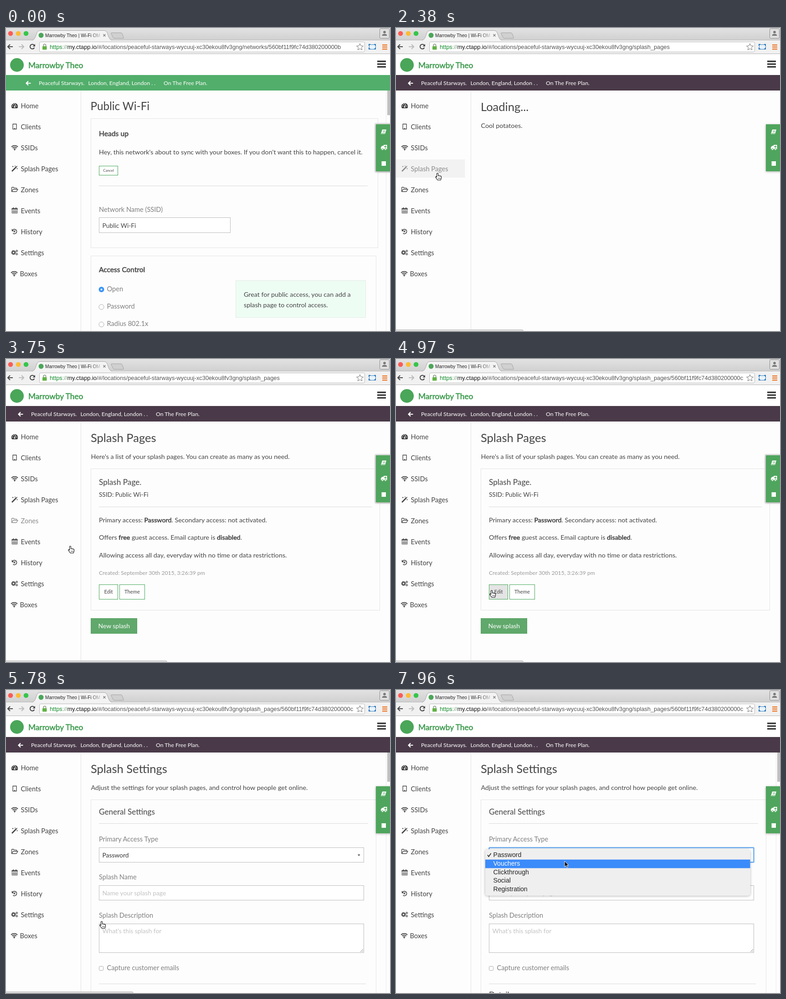
Write an HTML page that moves like this. It is 843 px wide and 664 px high and loops after 8000 ms.

```html
<!DOCTYPE html>
<html lang="en">
<head>
<meta charset="utf-8">
<title>Splash page settings</title>
<style>
html, body { margin: 0; width: 100%; height: 100%; overflow: hidden; background: #fdfdfd; }
svg { display: block; width: 100vw; height: 100vh; }
text { white-space: pre; font-family: Lato, sans-serif; }
.ui { font-family: "Liberation Sans", Arial, sans-serif; }
</style>
</head>
<body>
<svg id="stage" viewBox="0 0 843 664"></svg>
<script>
const INK = '#444', SOFT = '#808080', GREEN = '#4aa659', LINE = '#e4e4e4';
const BRAND = 'Marrowby Theo', PLACE = 'Peaceful Starways';

// Markup helpers
const text = (x, y, s, size = 14.3, fill = INK, more = '') =>
  `<text x="${x}" y="${y}" font-size="${size}" fill="${fill}" ${more}>${s}</text>`;
const ui = (x, y, s, size, fill, more = '') => text(x, y, s, size, fill, 'class="ui" ' + more);
const bold = (x, y, s, size, fill = INK) => text(x, y, s, size, fill, `stroke="${fill}" stroke-width=".55"`);
const strong = s => `<tspan stroke="${INK}" stroke-width=".55">${s}</tspan>`;
const label = (x, y, s) => text(x, y, s, 14.6, SOFT);
const rect = (x, y, w, h, fill, more = '') =>
  `<rect x="${x}" y="${y}" width="${w}" height="${h}" fill="${fill}" ${more}/>`;
const box = (x, y, w, h, stroke = LINE, fill = 'none', more = '') =>
  rect(x + .5, y + .5, w, h, fill, `stroke="${stroke}" ${more}`);
const rule = (y, x2) => rect(204, y, x2 - 204, 1, '#dadada');
const circle = (x, y, r, fill, more = '') => `<circle cx="${x}" cy="${y}" r="${r}" fill="${fill}" ${more}/>`;
const path = (d, fill = 'none', stroke = 'none', w = 1, more = '') =>
  `<path d="${d}" fill="${fill}" stroke="${stroke}" stroke-width="${w}" ${more}/>`;
const group = (id, body, more = '') => `<g id="${id}" ${more}>${body}</g>`;
const at = (x, y, body) => `<g transform="translate(${x} ${y})">${body}</g>`;

const C = 'currentColor';
const wifi = path('M-7-1.5A10 10 0 0 1 7-1.5M-4.6 1A6.5 6.5 0 0 1 4.6 1M-2.2 3.4A3.2 3.2 0 0 1 2.2 3.4', 'none', C, 1.8)
  + circle(0, 5, 1.3, C);
const gear = (x, y, r) => circle(x, y, r, 'none', `stroke="${C}" stroke-width="${r * .7}"`)
  + circle(x, y, r * 1.45, 'none', `stroke="${C}" stroke-width="${r * .4}" stroke-dasharray="${r * .57}"`);
const icons = [
  path('M-5.8 6A7.2 7.2 0 1 1 5.8 6z', C) + path('M0 3L1.8-3', 'none', '#fff', 1.2)
    + [[-4.5, 1], [-3, -3], [0, -4.5], [4.5, 1]].map(p => circle(...p, .9, '#fff')).join('') + circle(0, 3, 1.5, '#fff'),
  path('M-4-5.5h8v11h-8zM-1 4h2', 'none', C, 1.3, 'stroke-linejoin="round"'),
  wifi,
  path('M-6 6L3.5-3.5', 'none', C, 2.6) + path('M3-3L5.5-5.5', 'none', C, 1.6)
    + path('M-4-6v3M-5.5-4.5h3M1-6.5v2M0-5.5h2M5.5-1v2.4M4.3.2h2.4', 'none', C, .9),
  path('M-6.5 4v-8q0-1 1-1h3l1.5 1.7h4.5q1 0 1 1v1.5M-6.5 4.5l3-5h10.5l-3 5z', 'none', C, 1.3, 'stroke-linejoin="round"'),
  path('M-6-4.5h12v10.5h-12zM-6 1h12M-6 3.5h12M-3-1.5v7.5M0-1.5v7.5M3-1.5v7.5', 'none', C, .8)
    + rect(-6.4, -5, 12.8, 2.6, C) + path('M-3-7v3M3-7v3', 'none', C, 1.6),
  path('M-3.8-3.8A5 5 0 1 1-3.5 4M.3-2.8v3.5h-2.6', 'none', C, 1.7) + path('M-6.3-6v5.2h5.2z', C),
  gear(-2.5, 0, 3.1) + gear(4.6, -3.4, 1.6) + gear(4.6, 3.4, 1.6),
  wifi
];
const items = ['Home', 'Clients', 'SSIDs', 'Splash Pages', 'Zones', 'Events', 'History', 'Settings', 'Boxes'];

const arrow = (x, y, fill, s = 1) =>
  at(x, y, path(`M${6 * s} 0H${-5 * s}M0 ${-5 * s}L${-5 * s} 0L0 ${5 * s}`, 'none', fill, 2.2));

const chrome = rect(0, 0, 843, 27, 'url(#strip)') + rect(0, 27, 843, 30, '#f1f1f1')
  + rect(0, 26, 843, 1, '#b9b9b9') + rect(0, 56, 843, 1, '#b4b4b4')
  + circle(10, 12, 5.3, '#fb5b55') + circle(27, 12, 5.3, '#fcbb36') + circle(44, 12, 5.3, '#35c649')
  + path('M57 27Q62 26 64 21L68 10Q70 5.5 74 5.5H216Q220 5.5 222 10L226 21Q228 26 233 27', '#f3f3f3', '#a9a9a9')
  + path('M232 10.5h20q2 0 3 2l3 8q1 2-1 2h-19q-2 0-3-2l-4-8q-1-2 1-2z', '#d0d0d0', '#a4a4a4')
  + circle(77, 16, 5.5, GREEN)
  + ui(86, 20, BRAND + ' | Wi-Fi OM', 10.1, 'url(#fade)')
  + path('M213.5 13.5l5 5m0-5l-5 5', 'none', '#777', 1.2)
  + box(820, 1, 21, 21, '#8d8d8d', '#e0e0e0', 'rx="2"') + circle(831, 9, 2.8, '#777') + path('M825.5 17q0-4 5.5-4t5.5 4z', '#777')
  + arrow(9, 41, '#4a4a4a') + `<g transform="matrix(-1 0 0 1 34 41)">${arrow(0, 0, '#bdbdbd')}</g>`
  + path('M62 38A5 5 0 1 0 62.3 43', 'none', '#4a4a4a', 2.1) + path('M64 35v5.5h-5.5z', '#4a4a4a')
  + box(73, 30, 714, 22, '#b8b8b8', '#fff', 'rx="3"')
  + rect(80, 40, 9.5, 7.5, '#63b246', 'rx="1"') + path('M82 40v-2a2.8 2.8 0 0 1 5.6 0v2', 'none', '#8a9a84', 1.6)
  + ui(96, 46, '<tspan fill="#118a2a">https</tspan><tspan fill="#6c9a70">://</tspan><tspan fill="#111">my.ctapp.io</tspan><tspan id="url"></tspan>', 12.8, '#555')
  + path('M777 34l2.1 5 5.4.4-4.1 3.5 1.3 5.3-4.7-2.9-4.7 2.9 1.3-5.3-4.1-3.5 5.4-.4z', '#fff', '#777')
  + box(797, 36, 14, 10, '#3f87c5', '#e8f3fc') + path('M797 39v-3h3M808 36h3v3M811 43v3h-3M800 46h-3v-3', 'none', '#2c75b8', 2)
  + [36, 40.5, 45].map(y => rect(826, y, 11, 2.4, '#ee7a2c')).join('');

const header = rect(0, 57, 843, 46, '#fff') + circle(24, 81, 15, GREEN) + bold(49, 88, BRAND, 17.3, '#3b9a4c')
  + [71.5, 77.5, 83.5].map(y => rect(815, y, 19, 3.2, '#2f2f2f')).join('')
  + rect(0, 103, 843, 34, '#52ae6b', 'id="bar"')
  + group('crumb', arrow(49, 121, '#fff', .9) + text(72, 125, PLACE + '.', 12.3, '#fff')
    + text(180.5, 125, 'London, England, London . .', 12.3, '#fff') + text(346, 125, 'On The Free Plan.', 12.3, '#fff'));

const sidebar = rect(164, 137, 1, 527, '#e2e2e2') + rect(0, 288, 151.5, 40, '#f2f2f2', 'id="active"')
  + items.map((s, i) => group('item' + i,
    at(i == 8 ? 18 : 19, 170 + 46 * i, icons[i]) + text(i == 8 ? 30.5 : 32.5, 175.5 + 46 * i, s, 14.6, C), `color="${INK}"`)).join('');

const heading = s => text(186, 182, s, 25.5);
const scroll = h => rect(834, 137, 1, 527, '#ebebeb') + rect(837, 137, 6, h, '#c1c1c1');
const halo = rect(809, 208, 40, 109, '#e6e6e6', 'rx="3"');
const field = (y, w, h) => box(204, y, w, h, '#bcbcbc', '#fff');
const outline = (x, y, w, h, s, size, base, id) =>
  box(x, y, w, h, '#48a75b', '#fff', `id="${id}"`) + text(x + w / 2 + .5, base, s, size, INK, 'text-anchor="middle"');

const network = text(185.5, 180, 'Public Wi-Fi', 24.2) + box(186, 198, 630, 283) + bold(204, 237, 'Heads up', 15.7)
  + text(204, 276.5, "Hey, this network's about to sync with your boxes. If you don't want this to happen, cancel it.")
  + outline(204, 302, 41, 20, 'Cancel', 8, 315, 'cancel') + rule(345.5, 794)
  + label(204, 402.5, 'Network Name (SSID)') + field(415, 288, 33) + text(211.5, 438, 'Public Wi-Fi', 13.8)
  + box(186, 499, 626, 200) + bold(204, 535, 'Access Control', 15.5)
  + ['Open', 'Password', 'Radius 802.1x'].map((s, i) =>
    (i ? circle(209.5, 573 + 38.3 * i, 5.5, '#fff', 'stroke="#aaa"') : circle(209.5, 573, 6, '#3b94f7') + circle(209.5, 573, 2, '#fff'))
    + label(221.5, 576.5 + 38.3 * i, s)).join('')
  + box(504, 553, 285, 81, '#e2ebe6', '#eefdf4', 'id="tip"')
  + text(522, 588.5, 'Great for public access, you can add a') + text(522, 611.5, 'splash page to control access.')
  + scroll(54) + halo;

const loading = heading('Loading...') + text(186.5, 219, 'Cool potatoes.');

const list = heading('Splash Pages') + text(186.5, 219, "Here's a list of your splash pages. You can create as many as you need.")
  + box(186, 240, 634, 310) + text(204, 276, 'Splash Page.', 17.2) + text(204, 301.5, 'SSID: Public Wi-Fi', 13.6) + rule(323.5, 803)
  + text(204, 357.5, `Primary access: ${strong('Password')}. Secondary access: not activated.`)
  + text(204, 396, `Offers ${strong('free')} guest access. Email capture is ${strong('disabled')}.`)
  + text(204, 434.5, 'Allowing access all day, everyday with no time or data restrictions.')
  + text(204, 472.5, 'Created: September 30th 2015, 3:26:39 pm', 12.15, '#999')
  + outline(204, 494, 41, 32, 'Edit', 11.2, 514, 'edit') + outline(249, 494, 55, 32, 'Theme', 11.2, 514, 'theme')
  + box(186, 568, 101, 33, '#58a265', '#60a86b') + text(202.5, 590, 'New splash', 13.9, '#fff') + halo;

const settings = heading('Splash Settings')
  + text(186.5, 219, 'Adjust the settings for your splash pages, and control how people get online.')
  + box(186, 240, 626, 500) + text(204, 273, 'General Settings', 17.1) + rule(292, 795)
  + label(204, 332, 'Primary Access Type') + field(345, 581, 32)
  + text(211.5, 367, 'Password', 13.8, '#333') + path('M772 360.5h5.6l-2.8 3z', '#333')
  + box(204, 345, 581, 32, '#69a9ee', 'none', 'id="focus" stroke-width="2.4" rx="1"')
  + label(204, 414.5, 'Splash Name') + field(428, 581, 32) + text(211.5, 449.5, 'Name your splash page', 13.8, '#c2c2c2')
  + label(204, 499, 'Splash Description') + field(512, 581, 63) + text(211.5, 533, "What's this splash for", 13.8, '#c2c2c2')
  + path('M778 574l6-6M781.5 574l2.5-2.5', 'none', '#888')
  + box(204, 605, 9, 9, '#aaa', '#fff', 'rx="2"') + label(221.5, 614, 'Capture customer emails')
  + rule(643.5, 790) + text(204, 673.5, 'Details', 17.1) + scroll(64);

const sideTools = rect(812, 211, 34, 103, '#50a55d', 'filter="url(#shade)"')
  + path('M826 222.5h9l-3 10h-9z', '#fff') + path('M827.5 225.5h5M826.8 228h5M824 231.5h8', 'none', '#50a55d')
  + path('M823 261l3-3h3v-2h7.5v9.5h-13.5z', '#fff') + path('M832.7 257.5v5M830.2 260h5', 'none', '#50a55d', 1.5)
  + circle(826.5, 266, 2, '#fff', 'stroke="#50a55d"') + circle(833, 266, 2, '#fff', 'stroke="#50a55d"')
  + rect(824.5, 292, 9.5, 10, '#fff');

const options = ['Password', 'Vouchers', 'Clickthrough', 'Social', 'Registration'];
const optionY = i => 366 + 18.8 * i;
const menu = rect(196, 349, 581.5, 101.5, '#efefef', 'rx="5" filter="url(#shade)"')
  + rect(196, 0, 581.5, 18.8, '#3b8bfa', 'id="mark"')
  + path('M201 361.5l2.5 3.5 5-7', 'none', '#222', 1.6, 'id="tick"')
  + options.map((s, i) => ui(213.5, optionY(i), s, 14.1, '#222', `id="option${i}"`)).join('');

const pointer = path('M0 0v12.5l2.9-2.7 2 4.5 2.2-1-2-4.3h4z', '#111', '#fff', .9);
const hand = path('M-1.5 1q1.5-2 3 0v5q1-1 2.3.2 1.2-.8 2.2.4 2-.6 2.5 1v3.5l-1.5 4.2h-6.5L-4 9.5q-.6-2 1-2l1.5 1.5z', '#fff', '#111', 1.1, 'stroke-linejoin="round"')
  + path('M2 10v3M4 10v3M6 10v3', 'none', '#333', .8);

const stage = document.getElementById('stage');
stage.innerHTML = `<defs>
  <linearGradient id="strip" x2="0" y2="1"><stop stop-color="#e2e2e2"/><stop offset="1" stop-color="#d0d0d0"/></linearGradient>
  <linearGradient id="fade" gradientUnits="userSpaceOnUse" x1="185" x2="208"><stop stop-color="#222"/><stop offset="1" stop-color="#222" stop-opacity=".15"/></linearGradient>
  <filter id="shade" x="-20%" y="-20%" width="140%" height="140%"><feDropShadow dx="0" dy="1" stdDeviation="2.5" flood-opacity=".32"/></filter>
  </defs>` + rect(0, 0, 843, 664, '#fdfdfd') + sidebar
  + group('network', network) + group('loading', loading) + group('list', list) + group('settings', settings)
  + sideTools + header + chrome + group('menu', menu)
  + box(-4, 661, 1, 10, '#aaa', '#e6e6e6', 'id="status" rx="2"')
  + group('cursor', group('pointer', pointer) + group('hand', hand));

const $ = id => document.getElementById(id);
const show = (id, on) => $(id).style.display = on ? '' : 'none';
const set = (id, name, value) => $(id).setAttribute(name, value);
// Value of the last [time, value] entry that has begun
const pick = (t, list) => list.filter(e => t >= e[0]).pop()[1];

// Cursor moves: begin, end, number of steps, x, y
const moves = [
  [920, 1400, 9, 100, 330], [1580, 1580, 1, 98, 327], [1690, 1690, 1, 91, 318],
  [3450, 3570, 3, 128, 385], [3750, 3750, 1, 141, 410], [3830, 3830, 1, 146, 456],
  [4040, 4690, 8, 210, 507], [6350, 7130, 10, 352, 362], [7820, 7960, 3, 370, 375]
];
function cursorAt(t) {
  let x = 240, y = 600;
  for (const [a, b, n, tx, ty] of moves) {
    if (t < a) break;
    const p = Math.min(1, (Math.floor((t - a) / (b - a || 1) * (n - 1)) + 1) / n);
    const e = p * (2 - p);
    x += (tx - x) * e;
    y += (ty - y) * e;
  }
  return [x, y];
}

const root = `/#/locations/${PLACE.toLowerCase().replace(' ', '-')}-wycuuj-xc30ekou8fv3gng/`;
const urls = [[0, 'networks/560bf11f9fc74d380200000b'], [2020, 'splash_pages'], [4830, 'splash_pages/560bf11f9fc74d380200000c']];
const pages = [[0, 'network'], [2380, 'loading'], [2670, 'list'], [5420, 'loading'], [5780, 'settings']];
const statuses = [[0, 0], [1580, 279], [3270, 345], [3450, 353], [4040, 0], [4600, 279], [6170, 419], [6350, 0]];
const hovers = [[0, -1], [1690, 3], [3450, 4], [3830, -1]];

function draw(t) {
  const page = pick(t, pages), hover = pick(t, hovers), status = pick(t, statuses);
  const [x, y] = cursorAt(t);
  for (const id of ['network', 'loading', 'list', 'settings']) show(id, id == page);
  $('url').textContent = root + pick(t, urls);
  set('bar', 'fill', pick(t, [[0, '#52ae6b'], [920, '#60a76a'], [2380, '#4a3a49']]));
  set('crumb', 'transform', `translate(${t < 2380 ? 0 : -17})`);
  set('tip', 'fill', t < 920 ? '#eefdf4' : '#fdfdfd');
  items.forEach((s, i) => set('item' + i, 'color', i == hover ? '#8c8c8c' : INK));
  show('active', t >= 2380 && t < 3450);
  set('edit', 'fill', t < 4600 ? '#fff' : '#e4e4e4');
  show('status', status);
  set('status', 'width', status + 3.5);
  show('focus', t >= 7130);
  show('menu', t >= 7250);
  const row = y > 371 ? 1 : 0;
  set('mark', 'y', optionY(row) - 13.2);
  set('tick', 'stroke', row ? '#222' : '#fff');
  options.forEach((s, i) => set('option' + i, 'fill', i == row ? '#fff' : '#222'));
  const link = t >= 1400 && t < 4040 || t >= 4600 && t < 6350;
  show('cursor', t >= 920);
  show('hand', link);
  show('pointer', !link);
  set('cursor', 'transform', `translate(${x} ${y})`);
}

const begin = performance.now();
function tick() {
  draw((performance.now() - begin) % 8000);
  requestAnimationFrame(tick);
}
tick();
</script>
</body>
</html>
```
